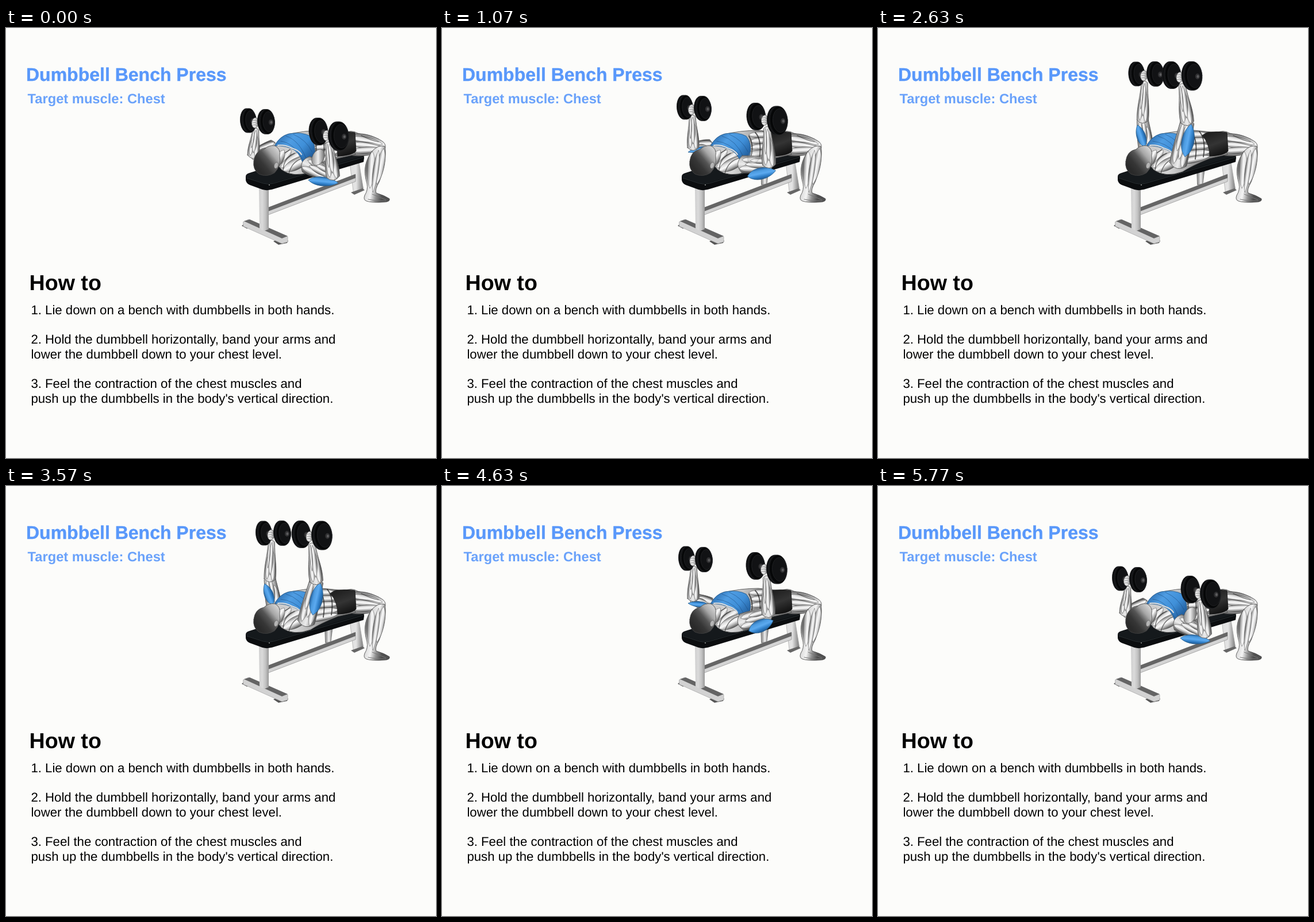
Recreate the animation shown at these times as an HTML page with a canvas. Size 748 by 748 pixels, loop 5.81 s.

```html
<!DOCTYPE html>
<html lang="en">
<head>
<meta charset="utf-8">
<title>Dumbbell Bench Press</title>
<style>
html, body { margin: 0; width: 100%; height: 100%; overflow: hidden; background: #fcfcfa }
canvas { display: block }
</style>
</head>
<body>
<canvas id="stage" width="748" height="748"></canvas>
<script>
const ctx = document.getElementById('stage').getContext('2d');
const LOOP = 5810;
const FLESH = ['#777', '#dedede', '#fafafa', '#b0b0b0', '#4c4c4c'];
const BLUE = ['#235f9c', '#4c9be0', '#5caaf0', '#2f7fc8', '#1e568f'];

// Height of the far dumbbell over time.
const lift = [[0, 161], [1070, 138], [1770, 98], [2630, 80], [2950, 79], [3570, 82], [4630, 126], [5810, 161]];

// height, far plates x x dy, near plates x y x y, far elbow, near elbow, chest patch x y angle length
const poses = [
  [161, 423, 454, 2, 545, 180, 580, 188, 430, 222, 569, 259, 552, 267, .1, 26],
  [138, 424, 455, 2, 548, 154, 585, 161, 437, 208, 569, 238, 556, 253, -.2, 25],
  [126, 427, 457, 2, 547, 139, 584, 145, 437, 196, 568, 223, 555, 243, -.4, 23],
  [98, 436, 467, 0, 533, 104, 571, 107, 449, 182, 555, 190, 549, 213, -.9, 25],
  [82, 450, 482, 0, 515, 84, 551, 86, 459, 162, 540, 166, 540, 196, -1.35, 29],
  [79, 452, 485, 0, 511, 81, 546, 82, 461, 160, 537, 163, 539, 195, -1.4, 29]
];

const clamp = (v, a = 0, b = 1) => Math.min(b, Math.max(a, v));

function heightAt(t) {
  const n = lift.length - 1;
  let i = 0;
  while (i < n - 1 && t >= lift[i + 1][0]) i++;
  const slope = j => j < 1 || j >= n ? 0 :
    (lift[j + 1][1] - lift[j - 1][1]) / (lift[j + 1][0] - lift[j - 1][0]);
  const [t0, y0] = lift[i], [t1, y1] = lift[i + 1];
  const d = t1 - t0, u = (t - t0) / d, v = 1 - u;
  const y = y0 * v * v * (1 + 2 * u) + y1 * u * u * (3 - 2 * u) +
    d * u * v * (slope(i) * v - slope(i + 1) * u);
  return clamp(y, 79, 161);
}

function poseAt(y) {
  let i = 0;
  while (i < poses.length - 2 && y < poses[i + 1][0]) i++;
  const a = poses[i], b = poses[i + 1], u = (y - a[0]) / (b[0] - a[0]);
  return a.map((v, k) => v + (b[k] - v) * u);
}

function shape(d, fill, edge, width = .8) {
  const p = new Path2D(d);
  if (fill) { ctx.fillStyle = fill; ctx.fill(p); }
  if (edge) { ctx.strokeStyle = edge; ctx.lineWidth = width; ctx.stroke(p); }
}

function shade(x0, y0, x1, y1, ...colors) {
  const g = ctx.createLinearGradient(x0, y0, x1, y1);
  colors.forEach((c, i) => g.addColorStop(i / (colors.length - 1), c));
  return g;
}

function oval(x, y, rx, ry, fill, turn = 0, edge) {
  ctx.beginPath();
  ctx.ellipse(x, y, rx, ry, turn, 0, 7);
  ctx.fillStyle = fill;
  ctx.fill();
  if (edge) { ctx.strokeStyle = edge; ctx.lineWidth = .8; ctx.stroke(); }
}

// Run paint() with the x axis along a line; it receives the length.
function along(x0, y0, x1, y1, paint) {
  ctx.save();
  ctx.translate(x0, y0);
  ctx.rotate(Math.atan2(y1 - y0, x1 - x0));
  paint(Math.hypot(x1 - x0, y1 - y0));
  ctx.restore();
}

// Pointed muscle belly.
function muscle(x0, y0, x1, y1, w, colors = FLESH) {
  along(x0, y0, x1, y1, l => shape(
    `M0 0C${l * .2} ${-w * 1.3} ${l * .7} ${-w * 1.3} ${l} 0C${l * .7} ${w * 1.3} ${l * .2} ${w * 1.3} 0 0Z`,
    shade(0, -w, 0, w, ...colors), colors === BLUE ? '#245985' : 'rgba(50,50,50,.55)', .7));
}

// Tapered limb made of a base and four muscles.
function limb(x0, y0, x1, y1, w0, w1, bulge) {
  along(x0, y0, x1, y1, l => {
    const w = w0 * bulge;
    shape(`M0 ${-w0}C${l * .35} ${-w} ${l * .6} ${-w1 * 1.15} ${l} ${-w1}Q${l + w1} 0 ${l} ${w1}
      C${l * .6} ${w1 * 1.15} ${l * .35} ${w} 0 ${w0}Q${-w0} 0 0 ${-w0}Z`,
      shade(0, -w, 0, w, '#777', '#d4d4d4', '#ececec', '#a8a8a8', '#4a4a4a'), '#555');
    muscle(-w0 * .3, w0 * .5, l * .75, w1 * .6, w * .42);
    muscle(0, -w0 * .5, l * .7, -w1 * .6, w * .38);
    muscle(l * .12, 0, l * .98, w1 * .1, w * .36);
    muscle(l * .3, -w0 * .45, l, -w1 * .5, w1 * .4);
  });
}

function plates(x, y, rx, ry) {
  for (let i = 0; i < 4; i++) {
    const q = i === 3 ? .82 : 1;
    oval(x - 4 + i * 2.4, y, (rx - 4) * q, ry * q, i % 2 ? '#111214' : '#060708', -.06, '#242527');
  }
  oval(x + rx * .42, y + 1, 4, 5, '#303032');
  oval(x + rx * .45, y + 1, 2, 2.6, '#5c5c5e');
}

function bar(x0, y0, x1, y1) {
  ctx.strokeStyle = '#4c4c4d';
  ctx.lineWidth = 5;
  ctx.beginPath();
  ctx.moveTo(x0, y0);
  ctx.lineTo(x1, y1);
  ctx.stroke();
}

function hand(x, y) {
  oval(x, y, 6, 9, shade(x - 6, y, x + 6, y, '#f2f2f2', '#dedede', '#848484'), .1, '#666');
  for (const k of [-4, 0, 4]) shape(`M${x - 5} ${y + k}q5 -2 9 1`, null, '#777', .7);
}

function bench() {
  shape('M598 231L613 228L622 282L605 288Z', shade(598, 0, 620, 0, '#dedede', '#e4e4e4', '#888'), '#aaa');
  shape('M600 286L620 279L624 282L606 290Z', '#666');
  shape('M456 313L608 255L608 267L456 325Z', '#d4d4d4', '#999');
  shape('M456 312L608 254L608 261L456 319Z', '#666');
  shape('M555 248L568 246L565 271L556 273Z', shade(555, 0, 568, 0, '#777', '#eee', '#777'), '#666');
  shape('M410 344L414 341L424 347L419 349ZM465 371L478 366L491 370L489 374L474 377Z', '#555');
  shape('M413 337L422 333L490 363L490 372L480 375L413 345Z', '#d2d2d2', '#aaa');
  shape('M414 336L424 333L490 362L480 366Z', '#646464');
  shape('M440 277H457V350L449 353L441 349Z', shade(440, 0, 457, 0, '#cfcfcf', '#dadada', '#c4c4c4', '#999'));
  shape('M417 260Q416 254 424 252L550 212L612 214Q624 218 623 226L622 233L469 279Q456 284 446 281L424 273Q416 270 417 260Z', '#0b0d0f');
  shape('M418 260Q417 255 424 253L550 213L612 215Q623 219 618 224L466 269Q456 272 447 269Z', '#15191c');
  shape('M419 261L447 270Q456 273 466 270L621 225', null, '#293033', 1);
  oval(458, 273, 1, 1, '#999');
}

function legs() {
  shape('M588 183Q600 176 612 183L648 193L640 201L598 199Z', '#999', '#555');
  shape('M603 185C620 181 642 188 656 198Q663 204 658 213C643 219 621 225 603 222Z',
    shade(620, 184, 616, 224, '#777', '#f0f0f0', '#c8c8c8', '#606060'), '#444');
  muscle(600, 191, 655, 202, 7);
  muscle(602, 202, 653, 206, 6);
  muscle(603, 214, 654, 211, 6);
  shape('M605 196Q630 199 655 207M618 187Q636 196 648 198', null, 'rgba(30,30,30,.6)', 1.2);
  shape('M636 215Q648 202 659 206C663 222 656 251 649 268Q641 282 644 287Q658 291 667 297Q669 303 654 303Q636 304 627 301Q621 299 624 291Q630 282 628 271C622 250 623 235 636 215Z',
    shade(622, 250, 661, 258, '#666', '#dadada', '#f4f4f4', '#8f8f8f', '#505050'), '#444');
  muscle(637, 215, 633, 279, 8);
  muscle(657, 210, 645, 272, 7);
  muscle(648, 213, 638, 286, 5);
  shape('M637 289Q649 294 661 299M630 298Q645 302 661 301', null, '#777', 1);
}

function torso(low) {
  shape('M466 211Q472 192 490 185Q522 178 550 178L590 182L608 220L577 227Q545 240 530 250Q500 261 480 247Q468 236 466 211Z',
    shade(480, 200, 565, 205, '#ccc', '#d5d5d5', '#b0b0b0', '#858585'), '#444');
  // Abdomen and flank.
  muscle(534, 186, 574, 185, 6);
  muscle(536, 197, 576, 195, 6);
  muscle(536, 208, 578, 205, 6);
  muscle(526, 222, 579, 215, 7);
  muscle(522, 234, 577, 223, 6);
  shape('M545 182Q557 194 552 228M559 180Q571 194 566 224M534 188Q544 205 536 228', null, 'rgba(20,20,20,.7)', 1.8);
  // Neck and shoulder.
  muscle(476, 240, 496, 212, 7);
  muscle(478, 243, 517, 215, 8);
  muscle(482, 248, 530, 224, 10);
  shape('M492 253Q498 230 519 226M482 246Q484 225 502 218M470 222Q486 219 494 211', null, 'rgba(35,35,35,.6)', 1.4);
  const drop = 13 * low;
  shape(`M467 205Q476 188 492 184Q515 180 529 188Q540 200 ${535 + low * 2} ${220 + drop}Q${528 + low * 4} ${229 + drop} 517 ${224 + drop}Q510 213 494 209Q482 204 467 205Z`,
    shade(475, 184, 527, 228, '#2a6cae', '#4f9de3', '#3f8fd8', '#225f9e'), '#235381');
  shape(`M487 188Q512 195 525 ${222 + drop}M500 185Q523 195 532 215M478 197Q500 199 517 ${217 + drop}`, null, 'rgba(25,70,120,.5)', 1);
  shape('M473 204Q486 203 497 209Q509 212 514 220', null, '#ddd', 2);
  shape('M572 182Q590 179 607 182L609 214Q602 222 577 223Q577 201 564 187Z', shade(575, 183, 590, 223, '#1f1f1f', '#343434', '#121212'), '#111');
}

function head() {
  muscle(464, 244, 484, 212, 9);
  shape('M431 232Q433 214 449 211Q457 203 468 205Q478 210 476 222Q479 240 467 252Q454 260 440 254Q429 246 431 232Z',
    shade(438, 244, 474, 214, '#2a2a2a', '#363636', '#555', '#a8a8a8', '#cfcfcf'), '#444');
  oval(470, 239, 3.5, 5.5, '#b5b5b5', .3, '#666');
}

function label(text, x, y, size, color, weight = 400, round = 0) {
  ctx.font = `${weight} ${size}px "Liberation Sans", Arial, sans-serif`;
  ctx.textRendering = 'geometricPrecision';
  ctx.fillStyle = ctx.strokeStyle = color;
  ctx.fillText(text, x, y);
  if (round) {
    ctx.lineWidth = round;
    ctx.strokeText(text, x, y);
  }
}

function words() {
  label('Dumbbell Bench Press', 35, 91.8, 32, '#5998fa', 700, .4);
  label('Target muscle: Chest', 37.6, 130.8, 23.7, '#6aa2fa', 700);
  label('How to', 40.6, 456, 37.6, '#000', 700);
  [['1. Lie down on a bench with dumbbells in both hands.', 498],
   ['2. Hold the dumbbell horizontally, band your arms and', 549],
   ['lower the dumbbell down to your chest level.', 575],
   ['3. Feel the contraction of the chest muscles and', 626],
   ["push up the dumbbells in the body's vertical direction.", 652]]
    .forEach(([line, y]) => label(line, 43.4, y, 22.2, '#000'));
}

function farArm(y, x0, x1, dy, ex, ey) {
  const hx = (x0 + x1) / 2 - 5, hy = y + dy / 2 + 3;
  limb(466, 207, ex, ey, 13, 10, 1.05);
  const up = clamp((138 - y) / 50);
  if (up) muscle(464, 207, ex - 9, ey + 8, 4 + 4 * up, BLUE);
  limb(ex, ey, hx + 1, hy + 12, 10, 5.5, 1.15);
  plates(x0, y, 15.5, 21);
  bar(x0 + 8, y, x1 - 6, y + dy);
  hand(hx, hy);
  plates(x1, y + dy, 16.5, 21.5);
}

function nearArm(low, x0, y0, x1, y1, ex, ey, px, py, turn, len) {
  const hx = (x0 + x1) / 2 - 5, hy = (y0 + y1) / 2 + 3;
  const dx = len * Math.cos(turn), dy = len * Math.sin(turn);
  plates(x0, y0, 18, 23.5);
  bar(x0 + 9, y0 + 1, x1 - 7, y1);
  limb(522, 237, ex, ey, 15, 12, 1.05);
  muscle(px - dx, py - dy, px + dx, py + dy, 11 - 3 * low, BLUE);
  if (low > 0) {
    ctx.globalAlpha = low;
    oval(543, 222 + 3 * low, 10, 15, shade(533, 0, 553, 0, '#999', '#eee', '#777'), .5, '#555');
    ctx.globalAlpha = 1;
  }
  limb(ex, ey, hx + 4, hy + 14, 11.5, 6, 1.2);
  hand(hx, hy);
  plates(x1, y1, 19.5, 25);
}

function draw(now) {
  const y = heightAt(now % LOOP);
  const [, fx0, fx1, fdy, nx0, ny0, nx1, ny1, fex, fey, ...near] = poseAt(y);
  const low = clamp((y - 130) / 31);
  ctx.fillStyle = '#fcfcfa';
  ctx.fillRect(0, 0, 748, 748);
  ctx.lineJoin = ctx.lineCap = 'round';
  words();
  bench();
  farArm(y, fx0, fx1, fdy, fex, fey);
  legs();
  torso(low);
  head();
  nearArm(low, nx0, ny0, nx1, ny1, ...near);
}

const start = performance.now();
function tick() {
  draw(performance.now() - start);
  requestAnimationFrame(tick);
}
tick();
</script>
</body>
</html>
```
